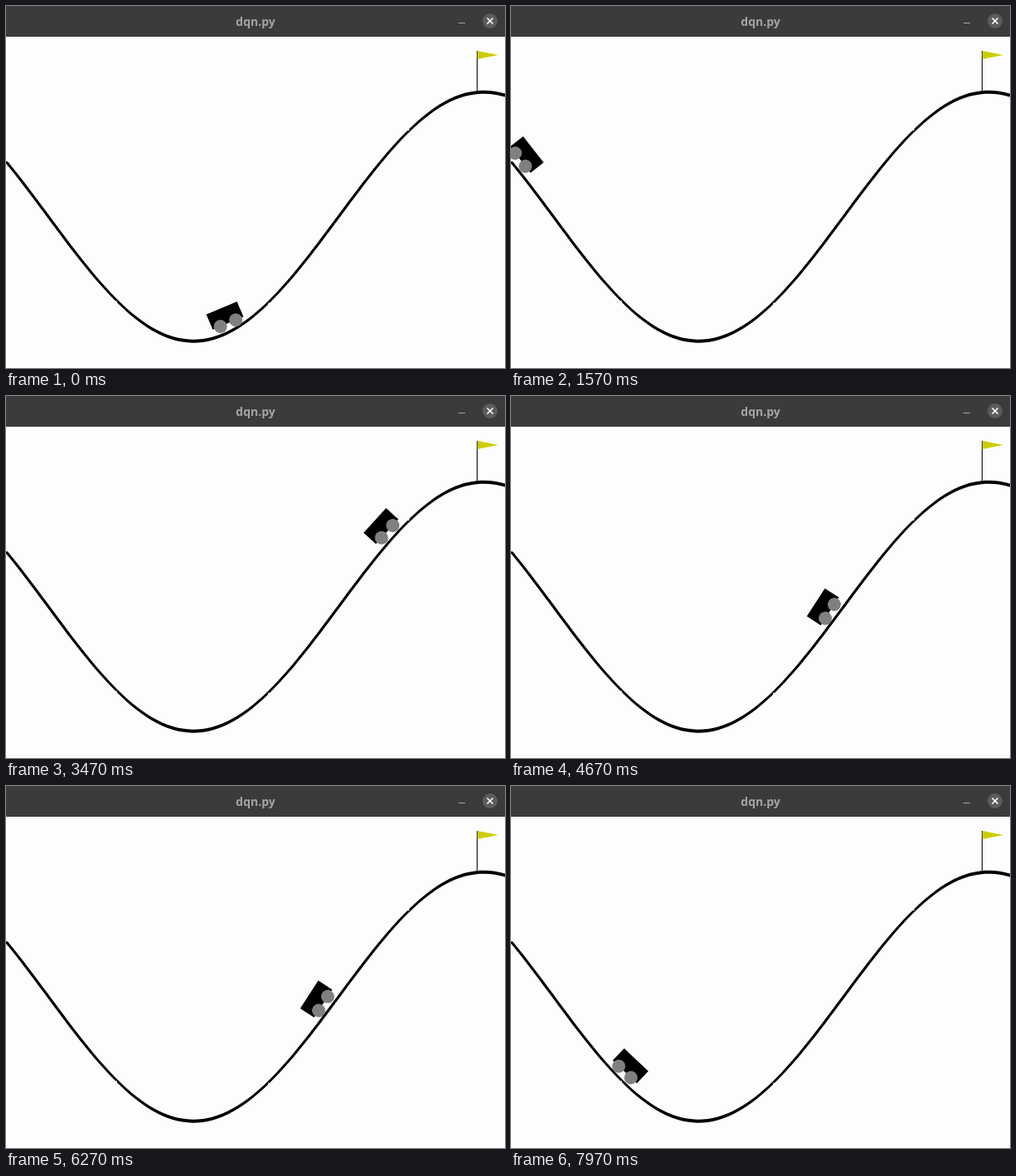
Recreate the animation shown at these times as an HTML page with a canvas. Size 600 px wide and 436 px high, loop 8000 ms.

```html
<!DOCTYPE html>
<html lang="en">
<head>
<meta charset="utf-8">
<title>dqn.py</title>
<style>
  html, body { margin: 0; height: 100%; overflow: hidden; background: #fdfdfd; }
  canvas { display: block; }
</style>
</head>
<body>
<canvas id="stage" width="600" height="436"></canvas>
<script>
const ctx = document.getElementById("stage").getContext("2d");
const LOOP = 8000, FRAMES = 240, STEPS_PER_FRAME = 2;
const MIN_X = -1.2, SCALE = 600 / 1.8, GROUND = 437;

// Each leg lasts until the next one begins. A leg with x starts at rest there;
// "glide" eases to a position, "push" drives the car with the engine.
const legs = [
  { at: -18, x: -0.1, glide: -0.7 },
  { at: 19, x: -0.7, push: 1 },
  { at: 60, x: -0.012, push: -1 },
  { at: 92, x: MIN_X, push: 1 },
  { at: 131, x: -0.5, glide: -0.831 },
  { at: 167, x: -0.831, push: 1 },
  { at: 219, x: 0.261, push: -1 },
  { at: 252, x: MIN_X, push: 1 },
  { at: 291, x: -0.52, glide: -0.81 },
  { at: 324, x: -0.81, push: 1 },
  { at: 362, push: -1 },
  { at: 399, x: MIN_X, push: 1 },
  { at: 439, x: -0.48, glide: -0.812 },
  { at: 480 }
];

function simulate() {
  const track = [];
  let x = 0, v = 0;
  for (let i = 0; i < legs.length - 1; i++) {
    const leg = legs[i], end = legs[i + 1].at;
    if (leg.x !== undefined) { x = leg.x; v = 0; }
    for (let step = leg.at; step < end; step++) {
      if (leg.glide !== undefined) {
        const p = (step - leg.at) / (end - leg.at);
        x = leg.x + (leg.glide - leg.x) * (1 - Math.cos(Math.PI * p)) / 2;
      }
      if (step >= 0) track[step] = x;
      if (leg.push) {
        v += leg.push * 0.001 - 0.0025 * Math.cos(3 * x);
        v = Math.max(-0.07, Math.min(0.07, v));
        x += v;
        if (x < MIN_X) { x = MIN_X; v = 0; }
      }
    }
  }
  return track;
}
const positions = simulate();

const screenX = x => (x - MIN_X) * SCALE;
const screenY = x => GROUND - (0.45 * Math.sin(3 * x) + 0.55) * SCALE;

function line(points, width, color) {
  ctx.beginPath();
  points.forEach(([x, y]) => ctx.lineTo(x, y));
  ctx.lineWidth = width;
  ctx.strokeStyle = color;
  ctx.stroke();
}

function disc(x, y, r, color) {
  ctx.beginPath();
  ctx.arc(x, y, r, 0, 2 * Math.PI);
  ctx.fillStyle = color;
  ctx.fill();
}

const hill = Array.from({ length: 100 }, (_, i) => {
  const x = MIN_X + 1.8 * i / 99;
  return [screenX(x), screenY(x)];
});

// The line is 4 px thick along y where it is shallow and along x where it is steep.
function drawHill() {
  ctx.beginPath();
  for (let i = 1; i < hill.length; i++) {
    const [x1, y1] = hill[i - 1], [x2, y2] = hill[i];
    const steep = Math.abs(y2 - y1) > x2 - x1;
    const dx = steep ? 2 * Math.sign(y2 - y1) : 0, dy = steep ? 0 : -2;
    ctx.moveTo(x1 + dx, y1 + dy);
    ctx.lineTo(x2 + dx, y2 + dy);
    ctx.lineTo(x2 - dx, y2 - dy);
    ctx.lineTo(x1 - dx, y1 - dy);
    ctx.closePath();
  }
  ctx.fillStyle = "#000";
  ctx.fill();
}

function drawCar(x) {
  ctx.save();
  ctx.translate(screenX(x), screenY(x));
  ctx.rotate(-Math.cos(3 * x));
  ctx.fillStyle = "#000";
  ctx.fillRect(-20, -30, 40, 20);
  disc(10, -10, 8, "#808080");
  disc(-10, -10, 8, "#808080");
  ctx.restore();
}

function drawFlag() {
  const x = screenX(0.5), bottom = screenY(0.5), top = bottom - 50;
  line([[566.5, bottom], [566.5, top]], 1, "#000");
  ctx.beginPath();
  ctx.moveTo(x, top);
  ctx.lineTo(x, top + 10);
  ctx.lineTo(x + 25, top + 5);
  ctx.fillStyle = "#cccc00";
  ctx.fill();
}

function drawTitleBar() {
  ctx.fillStyle = "#3b3b3b";
  ctx.fillRect(0, 0, 600, 37);
  ctx.fillStyle = "#a4a4a4";
  ctx.font = "bold 14px 'Noto Sans', 'Open Sans', sans-serif";
  ctx.textAlign = "center";
  ctx.fillText("dqn.py", 300, 24);
  line([[544, 20.5], [552, 20.5]], 1, "#a4a4a4");
  disc(582, 18, 9, "#5c5c5c");
  line([[578.5, 14.5], [585.5, 21.5]], 1.6, "#fff");
  line([[585.5, 14.5], [578.5, 21.5]], 1.6, "#fff");
}

function draw() {
  const time = performance.now() % LOOP;
  const frame = Math.min(FRAMES - 1, Math.floor((time + 3.5) * FRAMES / LOOP));
  ctx.fillStyle = "#fdfdfd";
  ctx.fillRect(0, 0, 600, 436);
  drawHill();
  drawCar(positions[frame * STEPS_PER_FRAME]);
  drawFlag();
  drawTitleBar();
  requestAnimationFrame(draw);
}
draw();
</script>
</body>
</html>
```
